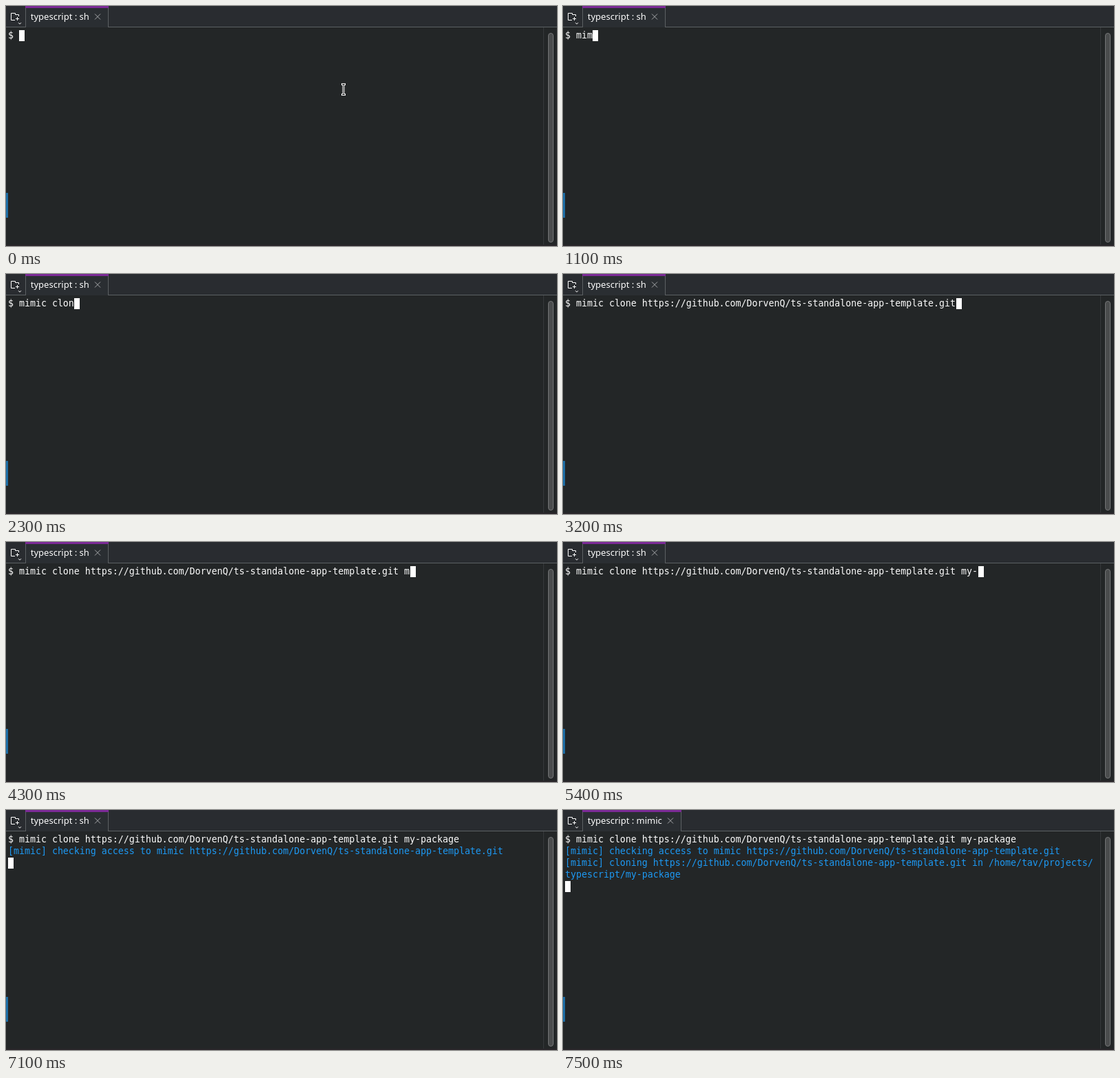
Recreate the animation shown at these times as an HTML page. Size 800 by 348 pixels, loop 8000 ms.

```html
<!DOCTYPE html>
<html lang="en">
<head>
<meta charset="utf-8">
<title>Terminal session</title>
<style>
  html, body { margin: 0; width: 100%; height: 100%; overflow: hidden; background: #232627; }
  svg { display: block; width: 100vw; height: 100vh; }
  text { white-space: pre; }
  .ui { font: 13px "Noto Sans", sans-serif; fill: #fcfcfc; }
  .term { font: 13.288px "DejaVu Sans Mono", monospace; font-variant-ligatures: none; fill: #fcfcfc; }
  .info { fill: #1d99f3; }
  .line { fill: none; stroke: #5c6063; }
</style>
</head>
<body>
<svg viewBox="0 0 800 348">
  <rect width="800" height="348" fill="#232627"/>
  <rect width="800" height="30" fill="#292c30"/>
  <path class="line" d="M0 30.5H800"/>

  <!-- new tab button -->
  <g fill="none" stroke="#fcfcfc">
    <path d="M13 20.5H7.5V10.5H13.5V12.5H18.5V15"/>
    <path d="M16.5 16V21M14 18.5H19"/>
    <path d="M18 24.2L20 26.2L22 24.2"/>
  </g>

  <!-- active tab -->
  <rect id="tab" x="28" width="121" height="31" fill="#2a2e32"/>
  <rect id="accent" x="28" width="121" height="3" fill="#7b2a96"/>
  <path id="edges" class="line"/>
  <text id="title" class="ui" x="35.8" y="20"></text>
  <path id="close" d="M-4 -4L4 4M4 -4L-4 4" fill="none" stroke="#a6a8aa"/>

  <!-- scroll bar and window edges -->
  <path d="M780.5 31V346" stroke="#36393b"/>
  <rect x="787.5" y="39.5" width="7" height="303" rx="3.5" fill="#4a4c4d" stroke="#737576"/>
  <rect y="271" width="3" height="36" fill="#1d6ea6"/>
  <rect y="346" width="800" height="2" fill="#29262a"/>

  <g id="rows"></g>
  <rect id="caret" width="8" height="16" fill="#fff"/>

  <g id="mouse" fill="none" stroke-linecap="square">
    <path d="M-1.5 1.5H1.5M0 1.5V16.5M-1.5 16.5H1.5" stroke="#fff" stroke-width="3"/>
    <path d="M-1.5 1.5H1.5M0 1.5V16.5M-1.5 16.5H1.5" stroke="#18191a"/>
  </g>
</svg>
<script>
const LOOP = 8000, CELL = 8, ROW = 17, LEFT = 3;
const url = "https://github.com/DorvenQ/ts-standalone-app-template.git";
const command = `$ mimic clone ${url} my-package`;
const output = [
  `[mimic] checking access to mimic ${url}`,
  `[mimic] cloning ${url} in /home/tav/projects/`,
  "typescript/my-package"
];

// [time, visible length of the command]
const typing = [
  [0, 2], [700, 3], [900, 4], [1100, 5], [1300, 6], [1500, 7], [1600, 8],
  [1800, 10], [2100, 11], [2300, 12], [2400, 13], [2500, 14], [3200, 71],
  [3900, 72], [4300, 73], [4700, 74], [5400, 75], [5900, 76], [6000, 77],
  [6200, 78], [6300, 79], [6400, 80], [6500, 81], [6600, 82]
];
const ENTER = 7000, CHECK = 7100, CLONE = 7500;

const el = id => document.getElementById(id);
const set = (node, attrs) => {
  for (const key in attrs) node.setAttribute(key, attrs[key]);
};

const rows = [0, 1, 2, 3].map(i => {
  const row = document.createElementNS("http://www.w3.org/2000/svg", "text");
  set(row, { class: i ? "term info" : "term", x: LEFT, y: 47 + i * ROW });
  return el("rows").appendChild(row);
});

function drawTab(busy) {
  const right = busy ? 172 : 149;
  el("title").textContent = "typescript : " + (busy ? "mimic" : "sh");
  for (const id of ["tab", "accent"]) set(el(id), { width: right - 28 });
  set(el("edges"), { d: `M28.5 3V31M${right - 0.5} 3V31` });
  set(el("close"), { transform: `translate(${right - 16} 15.5)` });
}

function drawTerminal(t) {
  const typed = typing.filter(step => step[0] <= t).pop()[1];
  const printed = t < CHECK ? 0 : t < CLONE ? 1 : 3;
  rows[0].textContent = command.slice(0, typed);
  output.forEach((line, i) => {
    rows[i + 1].textContent = i < printed ? line : "";
  });
  const col = t < ENTER ? typed : 0;
  const row = t < ENTER ? 0 : printed + 1;
  set(el("caret"), { x: LEFT + col * CELL, y: 35 + row * ROW });
}

function drawMouse(t) {
  const nudged = t >= 3700 && t < 3900;
  set(el("mouse"), {
    transform: `translate(490 ${nudged ? 110 : 112})`,
    visibility: t < 700 || nudged ? "visible" : "hidden"
  });
}

function draw(t) {
  drawTab(t >= CLONE);
  drawTerminal(t);
  drawMouse(t);
}

function tick() {
  draw(performance.now() % LOOP);
  requestAnimationFrame(tick);
}
tick();
</script>
</body>
</html>
```
